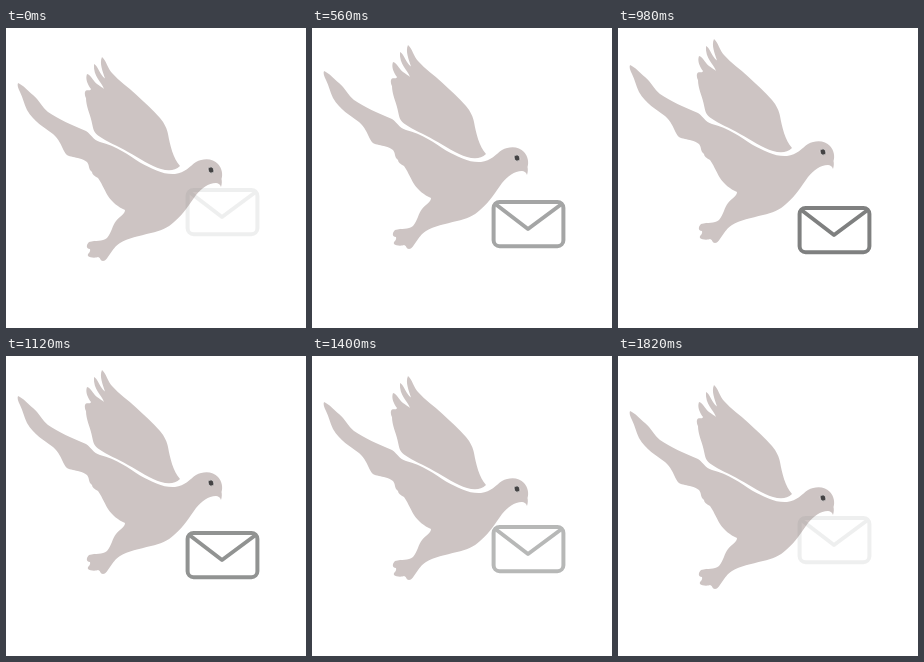
Animation, 300 px wide and 300 px high, one loop 1.89 s. Source, as an HTML page:

```html
<!DOCTYPE html>
<html lang="en">
<head>
<meta charset="utf-8">
<title>Dove and letter</title>
<style>
html, body { margin: 0; width: 100%; height: 100%; overflow: hidden; background: #fff; }
svg { display: block; width: 100%; height: 100%; }
</style>
</head>
<body>
<svg viewBox="0 0 300 300">
  <g id="dove" fill="#cdc4c3">
    <path d="M96 29C100 32 102 41 106 45C113 53 122 59 130 66.5C138 74 147 82 154 90
      C159 96 161 101 162 106C164 117 167 130 174 138C169 143 162 143 155 141
      C145 138 133 130 122 124C112 118 101 114 92 107.5C87 104 87 99 85.5 93
      C84 86 80 78 80 70C79 68 78 64 80 62.5C82 62 84.5 63 85 61C82 57 79 51 81 46
      C85 47 87 53 91 56C94 58 97 60 98 61C96 54 87 49 88 36
      C92 38 94 47 99 50.5C97 44 93 35 96 29Z"/>
    <path d="M12 55C17 57 22 63 27 67C33 72 36 79 42 84C52 91 66 97 80 103
      C86 107 87 112 94 114C110 118 123 127 134 134.5C146 141 158 147 169 146
      C179 145 184 138 190 134C197 130 207 130 212 136C216 140 217 147 215.5 151
      C216 153 216 156 215 159C214 156 212 155 210 155C202 155 196 160 190 167
      C184 175 178 186 168 194C162 200 154 203 145 205C133 208 122 210 114 215
      C109 218 107 222 104 226C101 230 100 233 97 233C94 233 95 230 92 229
      C90 230 84 230 82 228C81 225 85 225 84 221C80 221 80 217 83 214
      C90 212 96 214 101 210C106 204 106 198 110 193C114 188 119 186 119 182
      C112 179 106 174 102 168C98 161 95 154 92 150C88 148 86 146 86 144
      C82 141 84 138 81 134C76 130 71 130 67 129C62 128 60 127 58 123
      C55 117 53 111 47 106C38 99 28 94 21 82C18 76 17 70 14 64C12 60 11 57 12 55Z"/>
    <ellipse cx="205" cy="142" rx="2.8" ry="3.2" transform="rotate(-25 205 142)"
      fill="#444344" stroke="#e6e1e0" stroke-width=".7"/>
  </g>
  <g id="letter" fill="none" stroke="#767877" stroke-width="4" stroke-linejoin="round">
    <rect x="181.6" y="162" width="69.8" height="44.2" rx="6"/>
    <path d="M184 164.5L216 189L249 164.5"/>
  </g>
</svg>
<script>
const STEP = 70, STEPS = 27, TURN = 13;
const dove = document.getElementById("dove");
const letter = document.getElementById("letter");

function draw(ms) {
  const n = Math.floor(ms / STEP) % STEPS;
  const k = TURN - Math.abs(n - TURN);
  const shift = 1.5 * k;
  dove.setAttribute("transform", `translate(0 ${-shift})`);
  letter.setAttribute("transform", `translate(0 ${shift})`);
  letter.setAttribute("opacity", 0.115 + 0.885 * k / TURN);
}

const start = performance.now();
function tick() {
  draw(performance.now() - start);
  requestAnimationFrame(tick);
}
tick();
</script>
</body>
</html>
```
